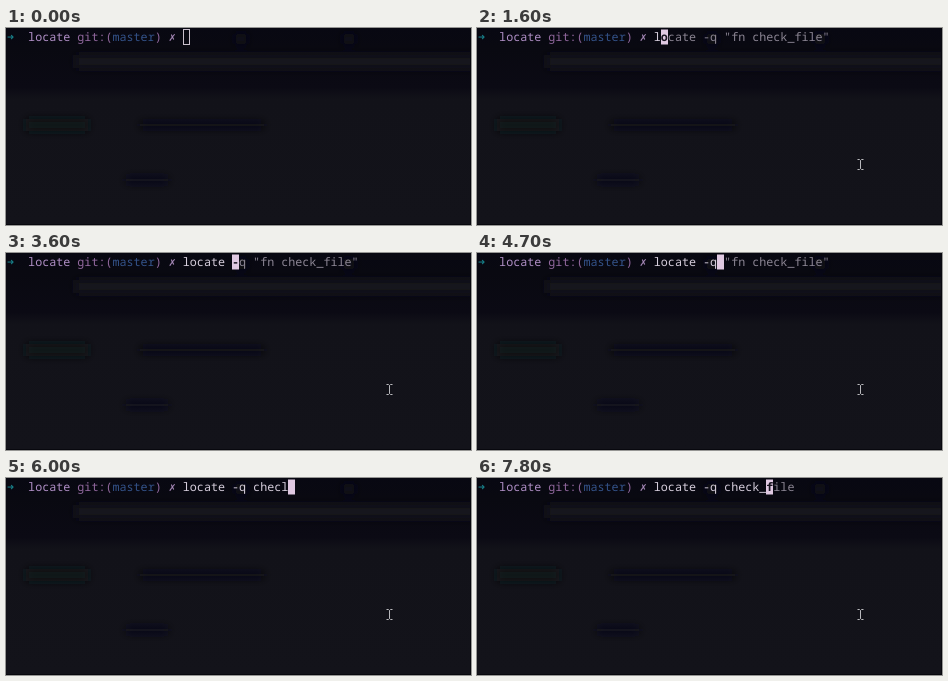
An HTML page that plays this animation: 465x197 px, repeating every 8 s.

```html
<!DOCTYPE html>
<html lang="en">
<head>
<meta charset="utf-8">
<title>Terminal typing</title>
<style>
  html, body { margin: 0; width: 100%; height: 100%; overflow: hidden; background: #121219; }
  svg { display: block; width: 465px; height: 197px; }
  text {
    font: 11.72px "Noto Sans Mono", "DejaVu Sans Mono", monospace;
    white-space: pre;
    text-rendering: geometricPrecision;
  }
  .prompt { font-weight: 700; }
  .symbol { font-family: "DejaVu Sans Mono", monospace; }
  .typed { fill: #d6cedc; }
  .hint { fill: #8b8593; }
  .under { fill: #17131f; font-weight: 700; }
</style>
</head>
<body>
<svg viewBox="0 0 465 197">
  <defs>
    <linearGradient id="backdrop" x2="0" y2="1">
      <stop offset="0" stop-color="#080812"/>
      <stop offset=".1" stop-color="#090911"/>
      <stop offset=".3" stop-color="#0b0a14"/>
      <stop offset=".36" stop-color="#121219"/>
      <stop offset="1" stop-color="#13131a"/>
    </linearGradient>
    <filter id="blur" x="-30%" y="-100%" width="160%" height="300%">
      <feGaussianBlur stdDeviation="4"/>
    </filter>
  </defs>

  <rect width="465" height="197" fill="url(#backdrop)"/>
  <g filter="url(#blur)">
    <rect x="70" y="27" width="400" height="13" fill="#13121a"/>
    <rect x="20" y="91" width="62" height="12" fill="#0d1418"/>
    <rect x="134" y="94" width="124" height="6" fill="#0f0f17"/>
    <rect x="120" y="149" width="42" height="6" fill="#0f0f1a"/>
    <circle cx="235" cy="11" r="6" fill="#11101a"/>
    <circle cx="343" cy="11" r="6" fill="#11101a"/>
  </g>
  <path d="M0 196.5H465M464.5 0V197" stroke="#08080e"/>

  <g class="prompt">
    <text class="symbol" x="1" y="13" fill="#177d87">➜</text>
    <text x="22.1" y="13" fill="#b08fc6">locate <tspan fill="#93699f">git:(</tspan><tspan fill="#34538a">master</tspan><tspan fill="#93699f">)</tspan></text>
    <text class="symbol" x="162.7" y="13" fill="#a386b5">✗</text>
  </g>

  <rect id="cursor" y="1.5" width="7" height="15"/>
  <text x="176.8" y="13"><tspan id="typed" class="typed"></tspan><tspan id="under" class="under"></tspan><tspan id="hint" class="hint"></tspan></text>

  <g id="pointer" fill="none">
    <path id="beam" d="M380.5 131.5h2l1 1 1-1h2M383.5 132.5v8M380.5 141.5h2l1-1 1 1h2" stroke="#b9b9bd"/>
  </g>
</svg>

<script>
  const LOOP = 8000, PITCH = 7.032, START = 176.8;
  const POINTER_AT = 400, FOCUS_AT = 500;
  const QUOTED = 'locate -q "fn check_file"';
  const PLAIN = 'locate -q check_file';
  const TYPO = 'locate -q checl';

  // time, typed characters, whole line including the suggestion
  const keys = [
    [0, 0, ''],
    [1600, 1, QUOTED], [1800, 2, QUOTED], [1900, 3, QUOTED], [2000, 4, QUOTED],
    [2400, 5, QUOTED], [2500, 6, QUOTED], [3600, 7, QUOTED], [3700, 8, QUOTED],
    [4700, 9, QUOTED], [4900, 10, QUOTED],
    [5600, 12, PLAIN], [5800, 13, PLAIN], [5900, 14, PLAIN], [6000, 15, TYPO],
    [6700, 14, PLAIN], [7400, 15, PLAIN], [7800, 16, PLAIN]
  ];

  const byId = id => document.getElementById(id);
  const [cursor, typed, under, hint, pointer] =
    ['cursor', 'typed', 'under', 'hint', 'pointer'].map(byId);

  function render(time) {
    const [, count, line] = keys.findLast(key => key[0] <= time);
    const focused = time >= FOCUS_AT;
    typed.textContent = line.slice(0, count);
    under.textContent = line.slice(count, count + 1);
    hint.textContent = line.slice(count + 1);

    const left = Math.round(START + count * PITCH);
    cursor.setAttribute('x', focused ? left : left + 0.5);
    cursor.setAttribute('width', focused ? 7 : 6);
    cursor.setAttribute('fill', focused ? '#e0c9e2' : 'none');
    cursor.setAttribute('stroke', focused ? 'none' : '#c9c0cc');
    pointer.setAttribute('visibility', time >= POINTER_AT ? 'visible' : 'hidden');
  }

  const begin = performance.now();
  function tick() {
    render((performance.now() - begin) % LOOP);
    requestAnimationFrame(tick);
  }
  tick();
</script>
</body>
</html>
```
